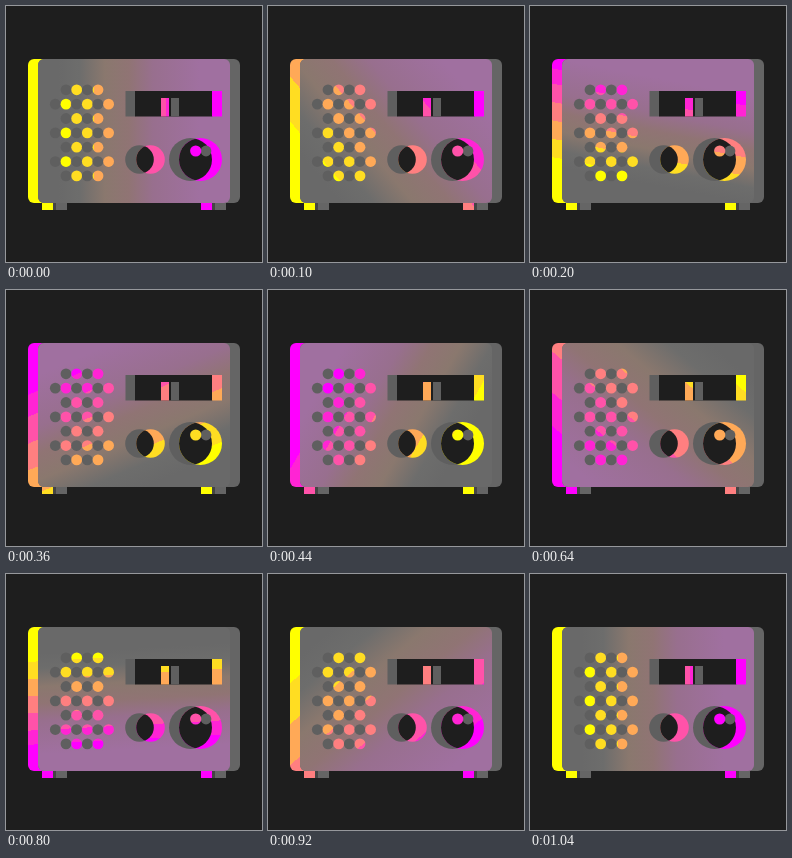
Recreate the animation shown at these times as an HTML page with a canvas. Size 256 by 256 pixels, loop 1.06 s.

```html
<!DOCTYPE html>
<html>
<head>
<meta charset="utf-8">
<title>Radio</title>
<style>
html, body { margin: 0; width: 100%; height: 100%; overflow: hidden; background: #1e1e1e; }
canvas { display: block; width: 100vw; height: 100vh; }
</style>
</head>
<body>
<canvas id="stage" width="256" height="256"></canvas>
<script>
const ctx = document.getElementById('stage').getContext('2d');
const DARK = '#1e1e1e', GRAY = '#656565', SHADE = '#5f5f5f';
const STEP = 20, STEPS = 53;
const BODY = { x: 22, y: 53, w: 202, h: 144 };

const NEON = ['#ff00ff', '#ff24d4', '#ff52a9', '#ff7f80', '#ffa957', '#ffdd22', '#ffff00'];
const EDGES = [0, .1, .24, .41, .58, .75, .92, 1];
const MUTED = [[0, '#a070a0'], [.33, '#986f8e'], [.5, '#907474'], [.67, '#8a786e'], [.85, '#6d6d6c'], [1, '#696969']];

// Flat bands of neon colour, each one ending where the next begins
const BANDS = NEON.flatMap((c, i) => [[EDGES[i], c], [EDGES[i + 1], c]]);

function gradient(turn, stops) {
  // The direction lingers at the axes and the ramp is longest on the diagonals
  const a = turn - .1 * Math.sin(4 * turn);
  const span = .7 + .4 * Math.sin(2 * a) ** 4;
  const gx = -Math.cos(a) / BODY.w / span, gy = Math.sin(a) / BODY.h / span;
  const k = .5 / (gx * gx + gy * gy);
  const cx = BODY.x + BODY.w / 2, cy = BODY.y + BODY.h / 2;
  const g = ctx.createLinearGradient(cx - gx * k, cy - gy * k, cx + gx * k, cy + gy * k);
  stops.forEach(([at, c]) => g.addColorStop(at, c));
  return g;
}

function rect(fill, x, y, w, h, r = 0) {
  ctx.fillStyle = fill;
  ctx.beginPath();
  ctx.roundRect(x, y, w, h, r);
  ctx.fill();
}

function disc(fill, x, y, r) {
  ctx.fillStyle = fill;
  ctx.beginPath();
  ctx.arc(x, y, r, 0, 7);
  ctx.fill();
}

// Two shifted discs whose overlap is dark
function knob(neon, x1, x2, y, r) {
  disc(SHADE, x1, y, r);
  disc(neon, x2, y, r);
  ctx.save();
  ctx.beginPath();
  ctx.arc(x1, y, r, 0, 7);
  ctx.clip();
  disc(DARK, x2, y, r);
  ctx.restore();
}

function foot(neon, x) {
  rect(neon, x, 197, 11, 7);
  rect('#444', x + 11, 197, 3, 7);
  rect(GRAY, x + 14, 197, 11, 7);
}

function draw(turn) {
  const neon = gradient(turn, BANDS), muted = gradient(turn, MUTED);
  rect(DARK, 0, 0, 256, 256);
  foot(neon, 36);
  foot(neon, 195);
  rect(neon, BODY.x, BODY.y, BODY.w, BODY.h, 6);
  rect(GRAY, BODY.x + 10, BODY.y, BODY.w, BODY.h, 6);
  rect(muted, BODY.x + 10, BODY.y, BODY.w - 10, BODY.h, 6);

  // Speaker
  for (let row = 0; row < 7; row++) {
    const wide = row % 2, y = 83.8 + row * 14.35;
    for (let i = 0; i < 2 + wide; i++) {
      const x = (wide ? 49.3 : 60) + i * 21.3;
      disc(SHADE, x, y, 5.4);
      disc(neon, x + 10.7, y, 5.4);
    }
  }

  // Tuning scale
  rect(SHADE, 119.5, 85, 10, 25.5);
  rect(DARK, 129, 85, 77.5, 25.5);
  rect(neon, 206, 85, 10, 25.5);
  rect(neon, 155, 92, 8, 18.5);
  rect(SHADE, 165, 92, 8, 18.5);

  // Knobs
  knob(neon, 133.5, 144.5, 153.5, 14.3);
  knob(neon, 184.5, 194.5, 153.5, 21.5);
  disc(SHADE, 200, 145, 5.4);
  disc(neon, 189.7, 145, 5.6);
}

const start = performance.now();
function frame() {
  const step = Math.floor((performance.now() - start) / STEP) % STEPS;
  draw(step / (STEPS - 1) * 2 * Math.PI);
  requestAnimationFrame(frame);
}
frame();
</script>
</body>
</html>
```
